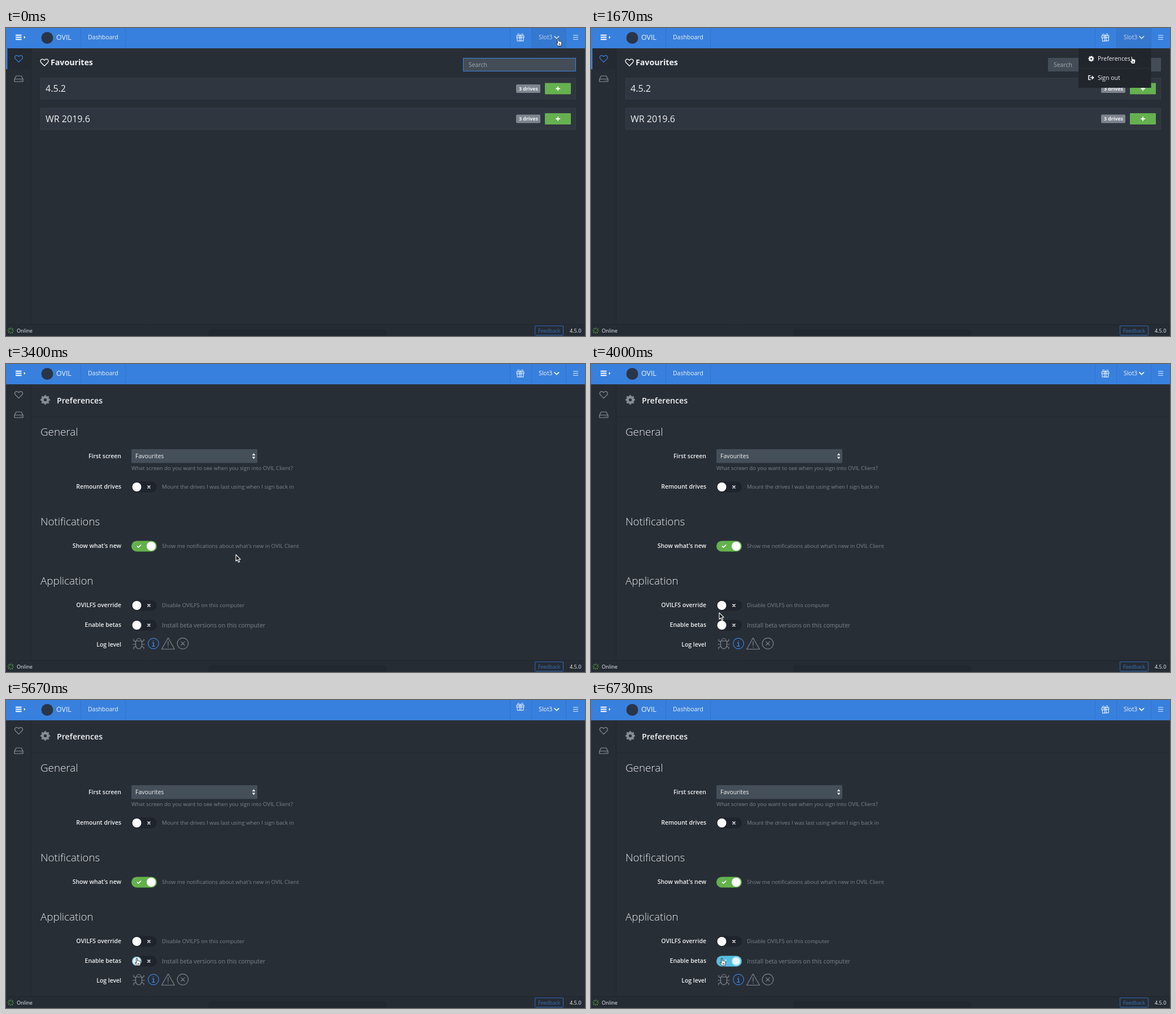
An HTML page that plays this animation: 1025 by 546 pixels, repeating every 6.8 s.

```html
<!DOCTYPE html>
<html lang="en">
<head>
<meta charset="utf-8">
<title>Preferences walkthrough</title>
<style>
  html, body { margin: 0; width: 100%; height: 100%; overflow: hidden; background: #282e36; }
  svg { display: block; width: 100%; height: 100%; }
  text { font: 400 10.45px "Open Sans", "Noto Sans", sans-serif; fill: #f0f2f4; }
  .title { font-size: 14.2px; font-weight: 600; }
  .section { font-size: 18.8px; font-weight: 300; fill: #eceef0; }
  .row { font-size: 16px; }
  .label { font-weight: 600; text-anchor: end; }
  .muted { fill: #7d848c; }
  .hint { font-size: 9.63px; fill: #7d848c; }
  .small { font-size: 9.1px; }
  .badge { font-size: 8.7px; font-weight: 700; }
  .line { fill: none; stroke: currentColor; stroke-linecap: round; stroke-linejoin: round; }

  .home, .prefs, .menu, .focus, .account, .heart, .strip, .press,
  .beta-track, .beta-knob, .beta-off, .beta-on { animation: 6.8s linear infinite; }
  .home, .account { animation-name: home; }
  .prefs { animation-name: prefs; }
  .menu { animation-name: menu; }
  .focus { animation-name: focus; }
  .heart { animation-name: heart; }
  .strip { animation-name: strip; }
  .press { animation-name: press; }
  .beta-track { animation-name: track; }
  .beta-knob { animation-name: knob; }
  .beta-off { animation-name: cross; }
  .beta-on { animation-name: check; }

  @keyframes home { 0%, 31.3% { opacity: 1; } 31.31%, 100% { opacity: 0; } }
  @keyframes prefs { 0%, 31.3% { opacity: 0; } 31.31%, 100% { opacity: 1; } }
  @keyframes menu { 0%, 4.8% { opacity: 0; } 7.8%, 31.3% { opacity: 1; } 31.31%, 100% { opacity: 0; } }
  @keyframes focus { 0%, 4.8% { opacity: 1; } 7.8%, 100% { opacity: 0; } }
  @keyframes heart { 0%, 31.3% { color: #3a82df; } 32.5%, 34% { color: #e6e9ec; } 37.5%, 100% { color: #8b9199; } }
  @keyframes strip { 0%, 33.5% { opacity: 1; } 37%, 100% { opacity: 0; } }
  @keyframes press { 0%, 81.2% { opacity: 0; } 81.3%, 100% { opacity: 1; } }
  @keyframes track { 0%, 83.6% { fill: #1f242c; } 88%, 100% { fill: #53bfe2; } }
  @keyframes knob { 0%, 83.6% { transform: none; animation-timing-function: ease-in-out; } 88%, 100% { transform: translateX(25.5px); } }
  @keyframes cross { 0%, 83.6% { opacity: 1; } 86%, 100% { opacity: 0; } }
  @keyframes check { 0%, 85% { opacity: 0; } 88%, 100% { opacity: 1; } }
</style>
</head>
<body>
<svg viewBox="0 0 1025 546" preserveAspectRatio="none">
  <defs>
    <path id="heart" class="line" d="M0 6.2 L-5.9 .2 C-9.3 -3.6 -4.3 -8.4 0 -3.8 C4.3 -8.4 9.3 -3.6 5.9 .2 Z"/>
    <g id="gear" fill="none" stroke="currentColor">
      <circle r="4.8" stroke-width="4.4"/>
      <circle r="7" stroke-width="3" pathLength="16" stroke-dasharray="1" stroke-dashoffset=".5"/>
    </g>
    <path id="cross" class="line" stroke-width="1.6" d="M-2-2 2 2M2-2-2 2"/>
    <path id="check" class="line" stroke-width="1.7" d="M-3 0-1 2.2 3.2-2.2"/>
    <rect id="track" x="-22.5" y="-9.5" width="45" height="19" rx="9.5"/>
    <circle id="knob" cx="-13" r="8" fill="#fff"/>
    <g id="off" color="#f4f5f6"><use href="#track" fill="#1f242c"/><use href="#knob"/><use href="#cross" x="8.5"/></g>
    <g id="on" color="#fff"><use href="#track" fill="#63b14b"/><use href="#knob" x="25.5"/><use href="#check" x="-9"/></g>
    <g id="drives">
      <rect x="61.5" y="-18.5" width="947" height="37" fill="#30363f" stroke="#393f48"/>
      <rect x="903" y="-7.5" width="43" height="15" rx="2" fill="#7e858e"/>
      <text class="badge" x="908" y="3.2">3 drives</text>
      <rect x="954" y="-10" width="46" height="20" rx="1" fill="#65b150"/>
      <path d="M973.3 0h7.6M977.1-3.8v7.6" stroke="#fff" stroke-width="1.8"/>
    </g>
  </defs>

  <rect width="1025" height="546" fill="#282e36"/>

  <!-- Favourites -->
  <g class="home">
    <use href="#heart" x="68" y="61" color="#fff" stroke-width="1.3"/>
    <text class="title" x="79" y="66" style="font-weight:700">Favourites</text>
    <rect x="809" y="53" width="200" height="24" fill="#444d57"/>
    <rect class="focus" x="809.5" y="53.5" width="199" height="23" fill="none" stroke="#3a82df"/>
    <text x="819" y="69" style="fill:#a2a9b1">Search</text>
    <use href="#drives" y="107.5"/>
    <text class="row" x="70" y="113">4.5.2</text>
    <use href="#drives" y="161"/>
    <text class="row" x="70" y="167">WR 2019.6</text>
  </g>

  <!-- Preferences -->
  <g class="prefs">
    <use href="#gear" x="69.5" y="63.5" color="#858c94"/>
    <text class="title" x="90" y="70">Preferences</text>
    <path d="M45 93H1025" stroke="#20293500"/>
    <path d="M45 93H1025" stroke="#202a36"/>

    <text class="section" x="61" y="127">General</text>
    <text class="label" x="204" y="167">First screen</text>
    <rect x="222" y="151" width="223" height="24.5" rx="2" fill="#454f59"/>
    <text x="229" y="167">Favourites</text>
    <path d="M435.7 162l2.8-4 2.8 4zM435.7 164.6l2.8 4 2.8-4z" fill="#fff"/>
    <text class="hint" x="222" y="187.7">What screen do you want to see when you sign into OVIL Client?</text>
    <text class="label" x="204" y="220.5">Remount drives</text>
    <use href="#off" x="244.5" y="218"/>
    <text class="hint" x="276" y="221.3">Mount the drives I was last using when I sign back in</text>

    <text class="section" x="61" y="286">Notifications</text>
    <text class="label" x="204" y="325.5">Show what's new</text>
    <use href="#on" x="244.5" y="323"/>
    <text class="hint" x="276" y="326.3">Show me notifications about what's new in OVIL Client</text>

    <text class="section" x="61" y="391">Application</text>
    <text class="label" x="204" y="430.5">OVILFS override</text>
    <use href="#off" x="244.5" y="428"/>
    <text class="hint" x="276" y="431.3">Disable OVILFS on this computer</text>
    <text class="label" x="204" y="465.5">Enable betas</text>
    <g transform="translate(244.5 463)" color="#f4f5f6">
      <use class="beta-track" href="#track"/>
      <g class="beta-off"><use href="#cross" x="8.5"/></g>
      <g class="beta-on"><use href="#check" x="-9"/></g>
      <g class="beta-knob">
        <use href="#knob"/>
        <circle class="press" cx="-13" r="7.4" fill="#e4f5fb" stroke="#7fd0ea" stroke-width="1.2"/>
      </g>
    </g>
    <text class="muted" x="276" y="466.5">Install beta versions on this computer</text>
    <text class="label" x="204" y="500.5">Log level</text>
    <g class="line" color="#80878f" stroke-width="1.2">
      <path d="M229.5 491h11v7a5.5 7 0 0 1-11 0zM231 491a4 4.5 0 0 1 8 0M225 497h4.5M240.5 497h4.5M226 488v2.5l3.5 2M244 488v2.5l-3.5 2M226 505v-2.500l3.800-2M244 505v-2.500l-3.800-2"/>
      <path d="M287 485.5l11.300 20h-22.600zM287 492v7M287 502v.4"/>
      <circle cx="313" cy="495.5" r="9.8"/>
      <path d="M309.8 492.300l6.400 6.400M316.200 492.300l-6.400 6.400"/>
      <g stroke="#3a82df"><circle cx="261" cy="495.5" r="9.4"/><path d="M259.5 494h1.700v6M259 500.300h4M261 490.700v.4" stroke-width="1.5"/></g>
    </g>
  </g>

  <!-- Sidebar -->
  <rect y="36" width="44" height="489" fill="#272d35"/>
  <path d="M44.5 36V525" stroke="#21272f"/>
  <g class="strip"><rect y="36" width="44" height="37" fill="#242a32"/><rect y="36" width="2.5" height="37" fill="#3a82df"/></g>
  <g class="heart"><use href="#heart" x="22.5" y="54.5" stroke-width="1.2"/></g>
  <path class="line" color="#8b9199" stroke-width="1.2" d="M15 90.5l3-5.500h9l3 5.500v4.500h-15zM15 90.5h15M25 93h.2M27.5 93h.2"/>

  <!-- Header -->
  <rect width="1025" height="36" fill="#3880dd"/>
  <rect class="account" x="930" width="61" height="36" fill="#3578d0"/>
  <path d="M132.5 0v36M211.5 0v36M892.5 0v36M930.5 0v36M991.5 0v36" stroke="#3273c8"/>
  <path d="M17 12.8h10.500M17 16.5h10.500M17 20.200h10.500" stroke="#fff" stroke-width="1.9"/>
  <path d="M31.8 14l2.600 2.500-2.600 2.500z" fill="#fff"/>
  <circle cx="73" cy="17.5" r="10.5" fill="#2a3548"/>
  <text x="89" y="21" style="font-size:12.4px">OVIL</text>
  <text x="145" y="20.3">Dashboard</text>
  <g transform="translate(910.5 16.5)">
    <path id="gift" class="line" color="#fff" stroke-width="1" d="M-6.300-2.800h12.600v3.300h-12.600zM-5.400.5v6h10.800v-6M-1.300-2.800v9.300M1.300-2.800v9.300M0-2.800C-1.500-6-3-6.500-4.200-5.900-5.500-5-4.500-3-3-2.800M0-2.800C1.500-6 3-6.500 4.200-5.900 5.500-5 4.500-3 3-2.800"/>
  </g>
  <text x="943" y="20.3">Slot3</text>
  <path class="line" color="#fff" stroke-width="1.7" d="M971 14.800l3.800 3.800 3.800-3.800"/>
  <rect class="account" x="942" y="9" width="39" height="15" fill="#3578d0" fill-opacity=".25"/>
  <path d="M1004 13h9M1004 16.500h9M1004 20h9" stroke="#e6effb" stroke-width="1.2"/>

  <!-- Account menu -->
  <g class="menu">
    <rect x="863" y="36" width="128.5" height="70" fill="#21262d"/>
    <path d="M863 71.5h128" stroke="#2b3138"/>
    <use href="#gear" transform="translate(885.5 54.5) scale(.6)" color="#fff"/>
    <text x="897" y="58.3">Preferences</text>
    <path class="line" color="#fff" stroke-width="1.5" d="M884 84.500h-3v7h3M884.500 88h5M887.200 85.500l2.500 2.500-2.500 2.500"/>
    <text x="897" y="91.8">Sign out</text>
  </g>

  <!-- Footer -->
  <rect y="525" width="1025" height="21" fill="#262c34"/>
  <path d="M0 525.5H1025" stroke="#20262e"/>
  <rect x="358" y="533" width="316" height="20" rx="8" fill="#22282f"/>
  <circle cx="8.3" cy="536.5" r="4" fill="none" stroke="#5cb84c" stroke-width="3" pathLength="24" stroke-dasharray="1 2"/>
  <text class="small" x="19" y="540">Online</text>
  <rect x="936.5" y="528" width="50" height="16.5" rx="1" fill="none" stroke="#3069b6"/>
  <text class="small" x="942" y="539.5" style="fill:#3571c0;font-size:8.9px">Feedback</text>
  <text class="small" x="998" y="540">4.5.0</text>

  <!-- Pointer, with its tip at the origin -->
  <g id="pointer" stroke-linejoin="round">
    <path id="arrow" fill="#14171b" stroke="#fff" stroke-width="1.1" d="M0 0v11.500l2.700-2.500 2 4.400 2-.9-2-4.200h3.600z"/>
    <path id="hand" fill="#fff" stroke="#14171b" stroke-width=".9" d="M-1 .8q1-1.300 2 0l.5 4.200q1-.9 1.800.2 1-.7 1.700.4 1.200-.5 1.600.7l.2 3-1.200 4.200h-5.200l-3-4.200q-.8-1.800.8-1.500l1.300 1.200zM2 9v2.500M3.600 9v2.500"/>
  </g>
</svg>
<script>
  const LOOP = 6800, FRAMES = 102;
  const $ = id => document.getElementById(id);

  // Tip of the pointer: time, x, y
  const route = [
    [640, 977, 18.5], [900, 972, 27], [1130, 961, 45], [1330, 957, 50],
    [2480, 957, 50], [2670, 915, 70], [2870, 795, 130], [3130, 607, 235],
    [3400, 407, 338], [3530, 333, 368], [3700, 262, 412], [3850, 232, 436],
    [4000, 227, 441], [4270, 228, 449], [4530, 230, 455], [4870, 231.5, 457.5]
  ];

  function along(points, t) {
    const next = points.findIndex(p => p[0] > t);
    if (next === 0) return points[0].slice(1);
    if (next < 0) return points.at(-1).slice(1);
    const [a, b] = [points[next - 1], points[next]];
    const u = (t - a[0]) / (b[0] - a[0]);
    return [a[1] + (b[1] - a[1]) * u, a[2] + (b[2] - a[2]) * u];
  }

  function play(el, pose) {
    const keys = Array.from({ length: FRAMES + 1 }, (_, i) => ({
      ...pose(Math.min(i, FRAMES - 1) * LOOP / FRAMES),
      offset: i / FRAMES,
      easing: 'steps(1, end)'
    }));
    el.animate(keys, { duration: LOOP, iterations: Infinity });
  }

  // Every five seconds the gift hops, then rocks to rest.
  function giftPose(t) {
    const s = (t + 4400) % 5000;
    const hop = s < 330 ? -8 * Math.sin(Math.PI * s / 330) : 0;
    const swing = s < 330 ? 0 : 10 * Math.max(0, 1 - s / 4700) * Math.sin(2 * Math.PI * s / 560);
    return { transform: `translateY(${hop}px) rotate(${swing}deg)` };
  }

  const pointing = t => t < 2140 || t > 4520;

  play($('gift'), giftPose);
  play($('pointer'), t => {
    const [x, y] = along(route, t);
    return { transform: `translate(${x}px, ${y}px)` };
  });
  play($('hand'), t => ({ opacity: pointing(t) ? 1 : 0 }));
  play($('arrow'), t => ({ opacity: pointing(t) ? 0 : 1 }));
</script>
</body>
</html>
```
